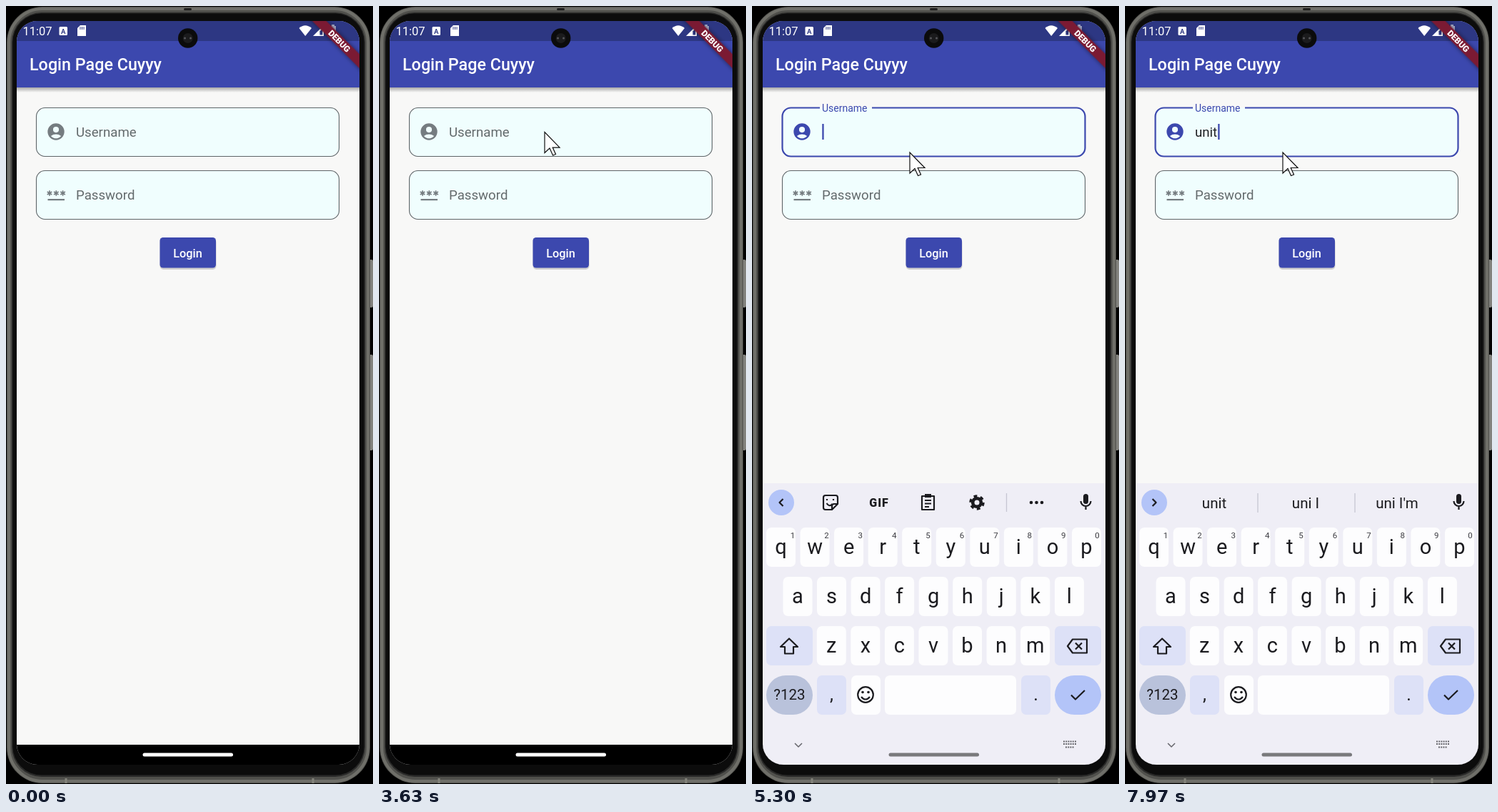
Animation, 514 px wide and 1089 px high, one loop 8 s. Source, as an HTML page:

```html
<!DOCTYPE html>
<html lang="en">
<head>
<meta charset="utf-8">
<title>Login page</title>
<style>
  html, body { margin: 0; width: 100%; height: 100%; overflow: hidden; background: #000; }
  svg { display: block; width: 514px; height: 1089px; font-family: Roboto, sans-serif; }
  .mid { text-anchor: middle; }
  .line { fill: none; stroke: #1b1b1f; stroke-width: 2.2; stroke-linejoin: round; }
  .sep { stroke: #c6c6d2; stroke-width: 1.3; }
  .ribbon { fill: #7b1a33; filter: drop-shadow(0 0 3px rgba(0, 0, 0, .5)); }
</style>
</head>
<body>
<svg viewBox="0 0 514 1089">
  <defs>
    <clipPath id="screen"><rect x="15" y="21" width="480" height="1041" rx="29"/></clipPath>
    <linearGradient id="shade" x2="0" y2="1">
      <stop offset="0" stop-color="#000" stop-opacity=".32"/>
      <stop offset="1" stop-color="#000" stop-opacity="0"/>
    </linearGradient>
    <path id="star" d="M0-3.8V3.8M-3.3-1.9 3.3 1.9M-3.3 1.9 3.3-1.9" stroke="#757c80" stroke-width="1.7"/>
    <g id="mic">
      <rect x="-3.5" y="-12" width="7" height="14" rx="3.5" fill="#1b1b1f"/>
      <path class="line" d="M-7-2a7 7 0 0 0 14 0M0 5V10"/>
    </g>
  </defs>

  <!-- phone body -->
  <rect x="508" y="355" width="6" height="67" rx="2" fill="#82827d"/>
  <rect x="508" y="488" width="6" height="134" rx="2" fill="#82827d"/>
  <rect x="1" y="1" width="509" height="1087" rx="50" fill="#50504c"/>
  <rect x="4" y="4" width="503" height="1081" rx="47" fill="none" stroke="#6f6f69" stroke-width="4"/>
  <rect x="8" y="9" width="495" height="1070" rx="42" fill="#2a2a29"/>
  <rect x="9.500" y="10.500" width="492" height="1066" rx="40" fill="#0c0c0c"/>
  <rect x="249" y="3" width="11" height="3" rx="1.500" fill="#20201f"/>
  <path d="M84 1081v7M430 1081v7" stroke="#85857d" stroke-width="3"/>

  <g clip-path="url(#screen)">
    <rect x="15" y="21" width="480" height="1041" fill="#f8f8f7"/>
    <rect x="15" y="114" width="480" height="7" fill="url(#shade)"/>
    <rect x="15" y="21" width="480" height="93" fill="#3c48ae"/>
    <rect x="15" y="21" width="480" height="28" fill="#2d3783"/>
    <text x="33" y="90" font-size="23.3" font-weight="500" fill="#fff">Login Page Cuyyy</text>

    <!-- status bar -->
    <g fill="#fff">
      <text x="23.5" y="41" font-size="16.5">11:07</text>
      <rect x="74.500" y="29" width="11.500" height="12" rx="1.500"/>
      <path d="M104 27h8v15h-12V31z"/>
      <path d="M410.500 31Q419 23.500 428 31L419.200 42z"/>
      <path d="M445 27v15h-15z"/>
      <path d="M454 28h2v-2h4v2h2v14h-8z" opacity=".6"/>
    </g>
    <text class="mid" x="80.300" y="38.500" font-size="9.500" font-weight="700" fill="#2d3783">A</text>
    <path d="M104 29v4M106.500 29v4M109 29v4" stroke="#2d3783" stroke-width="1"/>
    <path d="M439.500 35.500 443.300 31.500V40.500H439.500z" fill="#2d3783"/>
    <g transform="translate(495 21) rotate(45)">
      <rect class="ribbon" x="-60" y="32.700" width="120" height="14"/>
      <text class="mid" x="0" y="44" font-size="11.900" font-weight="900" fill="#fff">DEBUG</text>
    </g>

    <!-- form -->
    <rect x="42.5" y="142.5" width="424" height="68" rx="12" fill="#f0fefe"/>
    <path id="border" fill="none"/>
    <path id="person" transform="translate(56 162) scale(1.167)" fill-rule="evenodd"
      d="M12 2a10 10 0 0 0 0 20a10 10 0 0 0 0-20zm0 4a3.500 3.500 0 0 1 0 7a3.500 3.500 0 0 1 0-7zm0 14c-2 0-4.400-.8-6.100-2.900c3.600-2.800 8.600-2.800 12.200 0c-1.700 2.100-4.100 2.900-6.100 2.900z"/>
    <text id="label">Username</text>
    <text id="typed" x="98" y="182.500" font-size="18.670" fill="#202124"></text>
    <rect id="under" x="98" y="184.500" height="1.300" fill="#202124"/>
    <rect id="caret" y="165" width="2.300" height="22" fill="#3c48ae"/>

    <rect x="42.5" y="230.5" width="424" height="68" rx="12" fill="#f0fefe" stroke="#5f6568" stroke-width="1.100"/>
    <use href="#star" x="61" y="262"/><use href="#star" x="70.300" y="262"/><use href="#star" x="79.600" y="262"/>
    <rect x="58.500" y="270" width="23.500" height="2.200" fill="#757c80"/>
    <text x="98" y="270.500" font-size="18.670" fill="#646a6c">Password</text>

    <rect x="215.500" y="326" width="79" height="43" rx="5" fill="#000" opacity=".16"/>
    <rect x="215.500" y="324" width="78.500" height="42.500" rx="4.500" fill="#3c48ae"/>
    <text class="mid" x="254.500" y="351.500" font-size="16.300" font-weight="500" fill="#fff">Login</text>

    <rect x="15" y="1034" width="480" height="28" fill="#000"/>

    <!-- keyboard, laid out at its resting place -->
    <g id="board" fill="#1b1b1f">
      <rect x="15" y="668" width="480" height="460" fill="#efeef6"/>
      <circle cx="41" cy="695" r="18" fill="#b3c4f8"/>
      <path id="chevron" class="line"/>
      <use href="#mic" x="467.500" y="695"/>
      <g id="tools">
        <path class="line" d="M103 685h14q3 0 3 3v9l-8 8h-9q-3 0-3-3v-14q0-3 3-3zM120 697h-5q-3 0-3 3v5M104.500 696q4 6 8 1M105 690v2M114 690v2"/>
        <text class="mid" x="178" y="700.500" font-size="16" font-weight="900" letter-spacing="1">GIF</text>
        <path class="line" d="M238 686h17v19h-17zM242 692h9M242 696.500h9M242 701h6"/>
        <path d="M242 683h9v5h-9z"/>
        <circle class="line" cx="315" cy="695" r="5.800" style="stroke-width:4.600"/>
        <circle class="line" cx="315" cy="695" r="9" style="stroke-width:3.400" stroke-dasharray="4.800 4.625"/>
        <path class="sep" d="M356.500 682v26"/>
        <circle cx="391" cy="695" r="2.300"/><circle cx="398.500" cy="695" r="2.300"/><circle cx="406" cy="695" r="2.300"/>
      </g>
      <g id="hints" class="mid" font-size="20.500">
        <path class="sep" d="M186 682v27M322 682v27"/>
        <text x="125" y="702.500"></text><text x="253" y="702.500"></text><text x="381" y="702.500"></text>
      </g>
      <g id="keys" class="mid"></g>
      <path class="line" d="M52 885.500 64 897h-6v9.500h-12V897h-6z"/>
      <path class="line" d="M449 886.500h20v19h-20l-7-9.500zM453 891.500l9 9M462 891.500l-9 9"/>
      <circle class="line" cx="159" cy="964" r="10.800"/>
      <path class="line" d="M153 967q6 7 12 0"/>
      <circle cx="155" cy="960.500" r="1.800"/><circle cx="163" cy="960.500" r="1.800"/>
      <path class="line" d="M447 964.500l6 6L466 958"/>
      <path class="line" d="M60 1032l5 5 5-5" style="stroke-width:1.500;stroke:#66666c"/>
      <path d="M436 1029.500h18M436 1033h18M439 1037.500h12" stroke="#66666c" stroke-width="2" stroke-dasharray="2 1.200"/>
    </g>
    <rect id="pill" x="191.500" y="1045.500" width="126.500" height="5" rx="2.500"/>
  </g>

  <circle cx="254.700" cy="45" r="13.700" fill="#0b0b0c"/>
  <circle cx="254.700" cy="45" r="7" fill="#1b1b1d"/>
  <circle cx="250.500" cy="45" r="1.500" fill="#55555a"/><circle cx="258.500" cy="45" r="1.500" fill="#55555a"/>

  <path id="mouse" d="M0 0V29L7 22.500 11.500 32.500 15.500 31 11.200 21.500H21z" fill="#fff" stroke="#111" stroke-width="1.200"/>
</svg>

<script>
const $ = id => document.getElementById(id);
const LOOP = 8000, INDIGO = '#3c48ae';
const FOCUS = 4940, FLOAT = 4975, SLIDE = 4814;

// [time, typed text, suggestions]
const typing = [
  [6200, 'u', ['u', 'I', 'up']],
  [6720, 'un', ['un', 'in', 'up']],
  [7170, 'uni', ['uni', 'I', 'uni I']],
  [7600, 'unit', ['unit', 'uni I', "uni I'm"]]
];
const mousePath = [[2700, 312, -36], [2920, 296, 11], [3100, 296, 11], [3800, 221, 205]];

const clamp = x => Math.max(0, Math.min(1, x));
const lerp = (a, b, p) => a + (b - a) * p;
const smooth = p => p * p * (3 - 2 * p);
const mix = (a, b, p) => `color-mix(in srgb, ${b} ${p * 100}%, ${a})`;

function buildKeys() {
  let out = '';
  const key = (x, y, w, label = '', size = 29, fill = '#fdfdfe', r = 7) => {
    out += `<rect x="${x - w / 2}" y="${y}" width="${w}" height="55" rx="${r}" fill="${fill}"/>
      <text x="${x}" y="${y + 27 + size * .33}" font-size="${size}">${label}</text>`;
  };
  const row = (letters, x, y) => [...letters].forEach((c, i) => key(x + i * 47.55, y, 41, c));
  row('qwertyuiop', 40.5, 730);
  row('asdfghjkl', 64, 799);
  row('zxcvbnm', 111.3, 868);
  for (let i = 0; i < 10; i++)
    out += `<text x="${57 + i * 47.4}" y="744.5" font-size="11.5" fill="#3c3c42">${(i + 1) % 10}</text>`;
  const pale = '#dde1f7';
  key(52.5, 868, 65, '', 20, pale);
  key(456.5, 868, 65, '', 20, pale);
  key(52.5, 937, 65, '?123', 20.5, '#b9c2db', 27.5);
  key(111.5, 937, 41, ',', 25, pale);
  key(159.5, 937, 41);
  key(278, 937, 184);
  key(397.5, 937, 41, '.', 25, pale);
  key(456.5, 937, 65, '', 20, '#b3c4f8', 27.5);
  $('keys').innerHTML = out;
}

function drawField(t, entry) {
  const focused = t >= FOCUS, p = smooth(clamp((t - FLOAT) / 167));
  const border = $('border'), label = $('label');
  border.setAttribute('d', `M${lerp(95, 168, p)} 142.5H454.5a12 12 0 0 1 12 12v44a12 12 0 0 1-12 12H54.5` +
    `a12 12 0 0 1-12-12v-44a12 12 0 0 1 12-12H95`);
  border.style.stroke = mix('#5f6568', INDIGO, p);
  border.style.strokeWidth = lerp(1.1, 2.2, p);
  label.setAttribute('transform', `translate(98 ${lerp(182.5, 147.8, p)}) scale(${lerp(1, .75, p)})`);
  label.style.fontSize = '18.67px';
  label.style.fill = mix('#646a6c', INDIGO, p);
  $('person').style.fill = focused ? INDIGO : '#757c80';

  const text = entry ? entry[1] : '';
  $('typed').textContent = text;
  const width = text ? $('typed').getComputedTextLength() : 0;
  $('under').setAttribute('width', text.length < 4 ? width : 0);
  $('caret').setAttribute('x', 98.3 + width + (text ? .7 : 0));
  const blink = (t - (entry ? entry[0] : FOCUS)) % 1000 < 500;
  $('caret').style.display = focused && blink ? '' : 'none';
}

function drawBoard(t, entry) {
  const left = (1 - clamp((t - SLIDE) / 300)) ** 3;
  $('board').setAttribute('transform', `translate(0 ${394 * left})`);
  $('pill').style.fill = left > 0 ? '#fff' : '#79797c';
  $('tools').style.display = entry ? 'none' : '';
  $('hints').style.display = entry ? '' : 'none';
  $('chevron').setAttribute('d', entry ? 'M38.500 690l5 5-5 5' : 'M43.500 690l-5 5 5 5');
  if (entry) $('hints').querySelectorAll('text').forEach((el, i) => el.textContent = entry[2][i]);
}

function drawMouse(t) {
  const mouse = $('mouse'), next = mousePath.findIndex(k => k[0] > t);
  mouse.style.display = next === 0 ? 'none' : '';
  if (next === 0) return;
  const b = mousePath.at(next), a = next < 0 ? b : mousePath[next - 1];
  const p = next < 0 ? 1 : smooth((t - a[0]) / (b[0] - a[0]));
  mouse.setAttribute('transform', `translate(${lerp(a[1], b[1], p)} ${lerp(a[2], b[2], p)})`);
}

function draw(now) {
  const t = now % LOOP, entry = typing.filter(k => k[0] <= t).pop();
  drawField(t, entry);
  drawBoard(t, entry);
  drawMouse(t);
}

buildKeys();
const start = performance.now();
function tick() {
  draw(performance.now() - start);
  requestAnimationFrame(tick);
}
tick();
</script>
</body>
</html>
```
